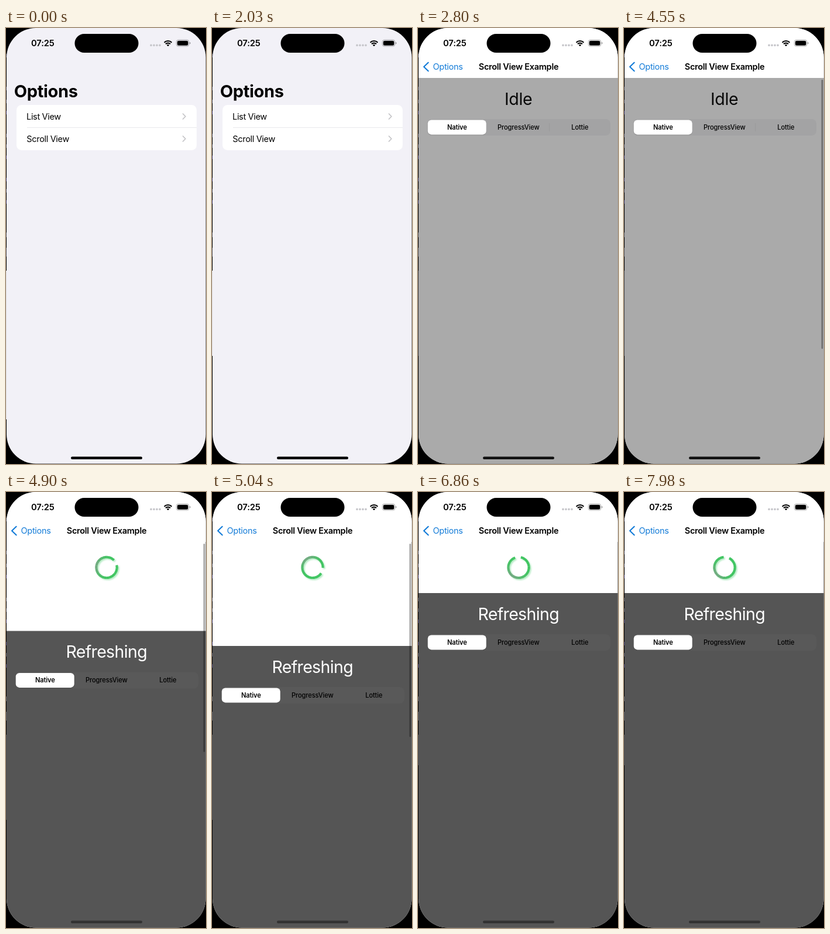
These frames come from a looping animation (342 by 742 pixels, 8 s). An HTML page:

```html
<!DOCTYPE html>
<html lang="en">
<head>
<meta charset="utf-8">
<title>Pull to refresh</title>
<style>
  html, body { margin: 0; width: 100%; height: 100%; overflow: hidden; background: #000; }
  svg { display: block; width: 342px; height: 742px; }
  text { font-family: Inter, "Liberation Sans", sans-serif; font-optical-sizing: none; }
  .large { font-size: 29px; font-weight: 700; letter-spacing: -.35px; }
  .body { font-size: 14.5px; letter-spacing: -.32px; }
  .nav { font-size: 14.5px; font-weight: 600; letter-spacing: -.28px; }
  .clock { font-size: 14.7px; font-weight: 600; letter-spacing: -.1px; }
  .seg { font-size: 11.1px; font-weight: 500; letter-spacing: -.12px; }
  .state { font-size: 28.5px; }
  .mid { text-anchor: middle; }
  .line { fill: none; stroke-linecap: round; stroke-linejoin: round; }
</style>
</head>
<body>
<svg viewBox="0 0 342 742">
  <defs>
    <clipPath id="screenClip"><rect x="1" width="340.6" height="741.5" rx="50"/></clipPath>
    <clipPath id="groupClip"><rect x="18" y="131" width="308" height="77" rx="8.5"/></clipPath>
    <filter id="glow" x="-30%" y="-30%" width="160%" height="160%">
      <feDropShadow dx="2" dy="2" stdDeviation="1.2" flood-color="#34c759" flood-opacity=".38"/>
    </filter>
  </defs>
  <rect width="342" height="742"/>
  <g id="desktop"></g>
  <rect id="sliver" width="1" y="413"/>

  <g clip-path="url(#screenClip)">
    <g id="menu">
      <rect width="342" height="742" fill="#f2f1f7"/>
      <text id="menuTitle" class="large" x="13.8" y="117.5">Options</text>
      <g clip-path="url(#groupClip)">
        <rect x="18" y="131" width="308" height="77" fill="#fff"/>
        <rect id="press" x="18" y="169" width="308" height="39" fill="#d3d3d8"/>
        <path d="M36 169.4H326" stroke="#e3e3e6" stroke-width=".8"/>
      </g>
      <text class="body" x="35" y="155.7">List View</text>
      <text class="body" x="35.3" y="194">Scroll View</text>
      <path class="line" d="M302.5 146l4.4 4.5-4.4 4.5M302.5 184l4.4 4.5-4.4 4.5" stroke="#c3c3c6" stroke-width="1.7"/>
    </g>
    <rect id="dim" width="342" height="742"/>

    <g id="detail">
      <rect x="1" width="342" height="742" fill="#fff"/>
      <g id="spinner" filter="url(#glow)"><g id="ring"></g></g>
      <g id="content">
        <rect id="panel" x="1" width="342" height="742"/>
        <text id="state" class="state mid" x="171.7" y="46"></text>
        <rect id="track" x="15.5" y="70" width="313.5" height="28" rx="8"/>
        <path id="divider" d="M224.8 77v14" stroke="#000" stroke-opacity=".08" stroke-width=".8"/>
        <rect x="16.5" y="72.4" width="100.5" height="25" rx="6.5" fill-opacity=".12"/>
        <rect x="16.7" y="71.4" width="100" height="25" rx="6.2" fill="#fff"/>
        <text class="seg mid" x="66.8" y="88" style="font-weight:600">Native</text>
        <text class="seg mid" x="171.8" y="88">ProgressView</text>
        <text class="seg mid" x="276.8" y="88">Lottie</text>
      </g>
      <rect id="navBar" x="1" width="342" fill="#fff"/>
      <rect id="bar" x="337.6" y="88" width="2.6" rx="1.3" fill-opacity=".36"/>
    </g>

    <g id="back">
      <path id="chevron" class="line" d="M17.6 58.8L10 66l7.6 7.3" stroke="#147cd8" stroke-width="2.1"/>
      <text class="body" x="25.6" y="71.2" fill="#147cd8">Options</text>
    </g>
    <text id="navTitle" class="nav mid" x="172" y="71.2">Scroll View Example</text>

    <text class="clock" x="43" y="31">07:25</text>
    <rect x="117.5" y="10" width="109" height="32" rx="16"/>
    <g fill="#c6c6ca">
      <circle cx="248" cy="29.4" r="1.8"/><circle cx="253" cy="29.4" r="1.8"/>
      <circle cx="258" cy="29.4" r="1.8"/><circle cx="263" cy="29.4" r="1.8"/>
    </g>
    <path d="M270.6 24.7a9 9 0 0 1 12.8 0M273 27.3a5.6 5.6 0 0 1 8 0" fill="none" stroke="#000" stroke-width="2.1"/>
    <path d="M277 31.3l-2.2-2.3a3.1 3.1 0 0 1 4.4 0z"/>
    <rect x="291.3" y="20.2" width="21.6" height="11" rx="3.6" fill="none" stroke="#000" stroke-opacity=".36" stroke-width=".9"/>
    <rect x="292.8" y="21.7" width="18.6" height="8" rx="2.3"/>
    <path d="M314 23.8q1.5 .5 1.5 1.9t-1.5 1.9z" fill-opacity=".4"/>
    <rect id="home" x="111" y="729.6" width="122" height="4.4" rx="2.2"/>
  </g>
</svg>
<script>
const LOOP = 8000, STEP = 70, TOP = 85, REST = 87;
const NS = "http://www.w3.org/2000/svg";
const el = Object.fromEntries([...document.querySelectorAll("[id]")].map(e => [e.id, e]));

const set = (e, attrs) => { for (const k in attrs) e.setAttribute(k, attrs[k]); };
const add = (parent, tag, attrs) => {
  const e = document.createElementNS(NS, tag);
  set(e, attrs);
  return parent.appendChild(e);
};
const show = (e, on) => set(e, { visibility: on ? "visible" : "hidden" });
const ramp = (t, a, b) => Math.min(1, Math.max(0, (t - a) / (b - a)));
const smooth = p => p * p * (3 - 2 * p);
const easeOut = p => 1 - (1 - p) ** 3;
const settle = (ms, rate) => ms <= 0 ? 1 : (1 + rate * ms) * Math.exp(-rate * ms);
const mix = (a, b, p) => "rgb(" + a.map((v, i) => Math.round(v + (b[i] - v) * p)) + ")";

// Window specks left of the phone
for (const y of [44, 100, 122, 141, 180, 198, 217, 255, 274, 293])
  add(el.desktop, "rect", { y, width: 1, height: 6, fill: y % 2 ? "#3c3568" : "#4a4a58" });
for (const y of [348, 374])
  add(el.desktop, "rect", { y, width: 1, height: y === 348 ? 8 : 15, fill: "#55555a" });

// Ring: angles run clockwise from the centre of the gap
const GAP = 32, PARTS = 60, R = 17.6;
const point = deg => {
  const a = deg * Math.PI / 180;
  return `${(R * Math.cos(a)).toFixed(3)} ${(R * Math.sin(a)).toFixed(3)}`;
};
const parts = Array.from({ length: PARTS }, (_, i) => {
  const size = (360 - GAP) / PARTS, from = GAP / 2 + i * size;
  const to = from + size + (i < PARTS - 1 ? .8 : 0);
  const mute = Math.exp(-(((from - 217) / 55) ** 2));
  return add(el.ring, "path", {
    d: `M${point(from)}A${R} ${R} 0 0 1 ${point(to)}`,
    fill: "none", "stroke-width": 4.1,
    stroke: mix([60, 196, 94], [110, 170, 126], mute)
  });
});

function pullOffset(t) {
  if (t < 5040) return 177 * smooth(ramp(t, 4550, 5010));
  return REST + 90 * settle(t - 5040, .022);
}

function drawPush(t) {
  const left = settle(t - 2270, .021);
  const moving = t >= 2310, gone = t >= 2800;
  const x = gone ? 0 : 341 * left;
  const done = 1 - left;
  show(el.menu, !gone);
  show(el.press, moving && !gone);
  show(el.detail, moving);
  set(el.menu, { transform: `translate(${moving ? -102 * done : 0} 0)` });
  set(el.menuTitle, { opacity: moving ? Math.max(0, 1 - 1.5 * done) : 1 });
  set(el.dim, { "fill-opacity": moving && !gone ? .09 * done : 0 });
  set(el.detail, { transform: `translate(${x} 0)` });
  set(el.back, {
    opacity: moving ? ramp(done, .3, .95) : 0,
    transform: `translate(0 ${Math.min(1, x / 11)})`
  });
  set(el.chevron, { transform: `translate(${Math.min(6, x * .14)} 0)` });
  set(el.navTitle, { opacity: ramp(t, 2560, 2780) });
}

function drawPull(t) {
  const offset = pullOffset(t);
  const busy = t >= 4900;
  const header = TOP + 46 * (1 - easeOut(ramp(t, 2530, 2800)));
  set(el.content, { transform: `translate(0 ${header + offset})` });
  set(el.navBar, { height: header });
  set(el.panel, { fill: busy ? "#555" : "#aaa" });
  set(el.track, { fill: busy ? "#595959" : "#a3a3a4" });
  show(el.divider, !busy && t >= 2310);
  el.state.textContent = busy ? "Refreshing" : "Idle";
  el.state.style.letterSpacing = busy ? "-.65px" : "-.3px";
  set(el.state, { fill: busy ? "#fff" : "#080808" });

  const end = busy ? 507 - (offset - REST) : 546 - offset;
  set(el.bar, {
    height: end - 88,
    opacity: t < 4550 ? 0 : 1 - ramp(t, 5800, 6160)
  });

  const angle = busy ? 18 + .3343 * (t - 5040) : GAP / -2 - 90;
  const filled = busy ? 1 : ramp(offset, 0, 150);
  set(el.ring, { transform: `translate(172 128.4) rotate(${angle})` });
  parts.forEach((p, i) => set(p, { opacity: i < filled * PARTS ? 1 : 0 }));
  set(el.home, { fill: busy ? "#323232" : t >= 2380 ? "#111" : "#000" });
}

function drawDesktop(t) {
  const bottom = t < 420
    ? 666 - 99 * ramp(t, 0, 280)
    : 567 - 9 * ramp(t, 350, 700);
  set(el.sliver, {
    height: (t < 5040 ? bottom : t < 5390 ? 558 : 465) - 413,
    fill: t < 2310 ? "#dededf" : t < 4550 ? "#3a3a3c" : "#48484a"
  });
}

function draw(time) {
  const t = Math.floor((time % LOOP) / STEP) * STEP;
  drawPush(t);
  drawPull(t);
  drawDesktop(t);
}

let start;
function tick(now) {
  start ??= now;
  draw(now - start);
  requestAnimationFrame(tick);
}
draw(0);
requestAnimationFrame(tick);
</script>
</body>
</html>
```
